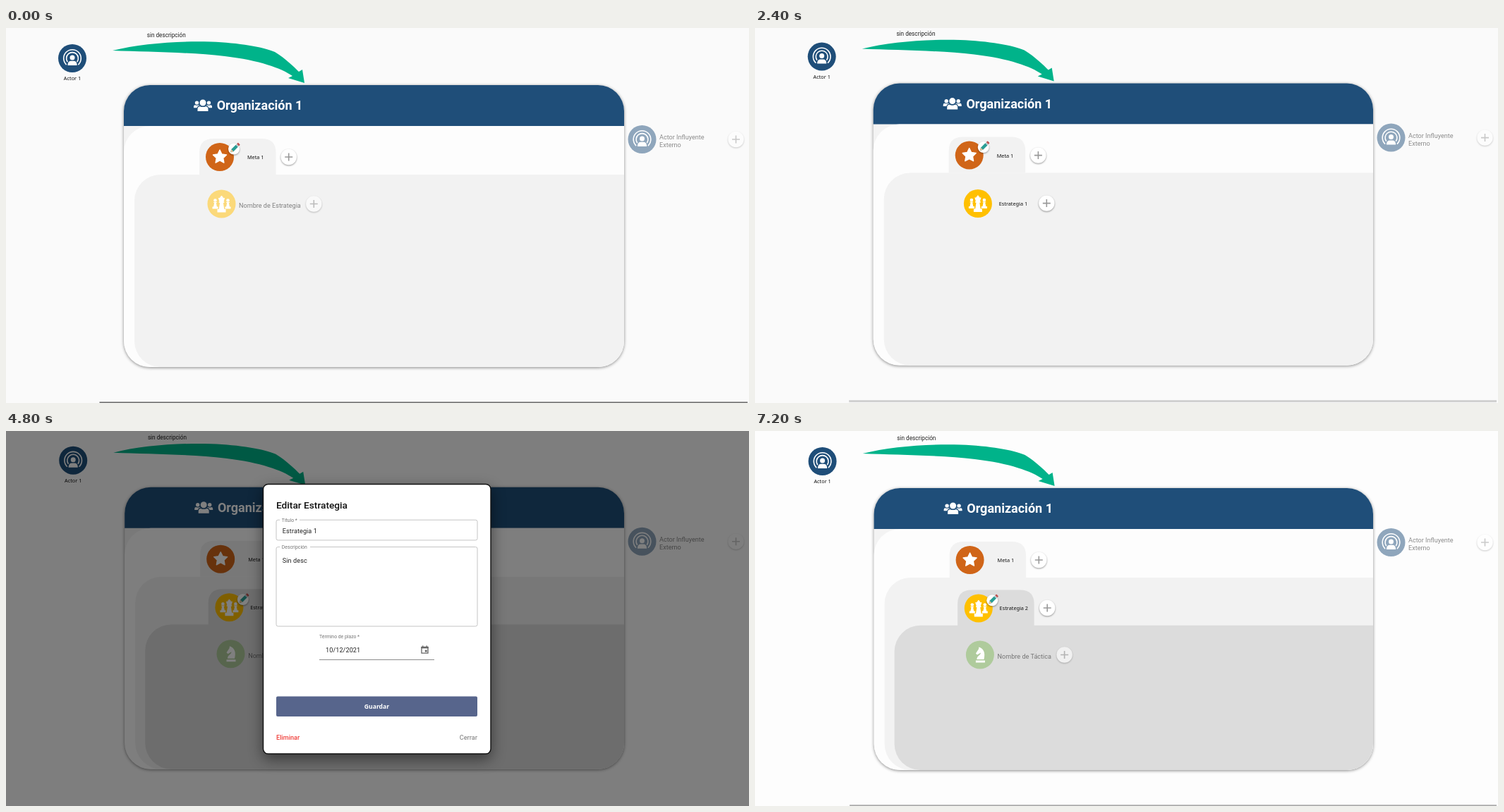
Write an HTML page that moves like this. It is 1053 by 532 pixels and loops after 8 s.

```html
<!DOCTYPE html>
<html lang="es">
<head>
<meta charset="utf-8">
<style>
html, body { margin: 0; width: 100%; height: 100%; overflow: hidden; background: #fafafa; }
svg { display: block; width: 1053px; height: 532px; }
text { font: 9.1px Roboto, sans-serif; white-space: pre; }
.name { font: 500 7.3px "Noto Sans", sans-serif; }
.head { font-weight: 700; font-size: 18px; }
.title { font-weight: 500; font-size: 13.7px; }
.label { font-size: 6.85px; }
.value { letter-spacing: .00938em; }
.action { font-weight: 500; }
.button { font: 700 8.6px "Noto Sans", sans-serif; }
.board { filter: drop-shadow(0 1px 2px #0007); }
.plus { filter: drop-shadow(0 1px 1.2px #0006); }
.dialog { filter: drop-shadow(0 7px 10px #0007); }
</style>
</head>
<body>
<svg id="stage" viewBox="0 0 1053 532"></svg>
<script>
const BLUE = '#1f4e79', RIGHT = 876, BOTTOM = 481, R = 37;
const HOLD = 1200, LOOP = 8000;

// One entry per hard cut: board offset, page colour, stage of the strategy, scrollbar colour, dialog
const scenes = [
  { dx: 0, dy: 0, page: '#fafafa', step: 0, bar: '#777' },
  { dx: 1.5, dy: -1.6, page: '#fafafa', step: 0, dialog: {
    x: 365, y: 72, h: 387, area: 98.5, button: 311, foot: 367, title: 'Nueva Estrategia', name: 'Estrategia 1',
    star: ' *', desc: 'Sin desc', wavy: true, submit: 'Agregar Estrategia' } },
  { dx: .7, dy: -2.4, page: '#fafafa', step: 1, bar: '#d0d0d0' },
  { dx: 1.2, dy: -2.2, page: '#fdfdfd', step: 2, bar: '#d0d0d0' },
  { dx: 1.2, dy: -1.3, page: '#fdfdfd', step: 2, dialog: {
    x: 364.5, y: 75, h: 382.5, area: 89.5, button: 301.5, foot: 362.5, title: 'Editar Estrategia', name: 'Estrategia 1',
    star: '', desc: 'Sin desc', submit: 'Guardar', remove: true } },
  { dx: .7, dy: -2.4, page: '#fdfdfd', step: 2, dialog: {
    x: 364, y: 65, h: 400, area: 89.3, button: 319.6, foot: 380.5, title: 'Editar Estrategia', name: 'Estrategia 2',
    star: '', desc: 'Sin desc 2', wavy: true, submit: 'Guardar', remove: true, error: true } },
  { dx: 1.6, dy: 0, page: '#fdfdfd', step: 2, bar: '#aaa', strategy: 'Estrategia 2' }
];

const text = (x, y, s, cls = '', fill = '#222', anchor = 'start') =>
  `<text x="${x}" y="${y}" class="${cls}" fill="${fill}" text-anchor="${anchor}">${s}</text>`;
const rect = (x, y, w, h, fill, extra = '') =>
  `<rect x="${x}" y="${y}" width="${w}" height="${h}" fill="${fill}" ${extra}/>`;
const path = (d, fill, extra = '') => `<path d="${d}" fill="${fill}" ${extra}/>`;
const circle = (x, y, r, fill) => `<circle cx="${x}" cy="${y}" r="${r}" fill="${fill}"/>`;
const at = (x, y, body, extra = '') => `<g transform="translate(${x} ${y})" ${extra}>${body}</g>`;
const badge = (x, y, fill, icon, extra) => at(x, y, circle(0, 0, 20, fill) + icon, extra);

// Arc around the origin, open at the bottom
const wave = (r, open) => {
  const x = r * Math.sin(open), y = r * Math.cos(open);
  return path(`M${-x} ${y}A${r} ${r} 0 1 1 ${x} ${y}`, 'none', 'stroke="#fff" stroke-width="1.6" stroke-linecap="round"');
};
const actorIcon = wave(12.3, .8) + wave(8.4, 1) + circle(0, -1, 3.5, '#fff') +
  path('M-6.5 10V8.5Q-6 4 -2 3.8H2Q6 4 6.5 8.5V10Z', '#fff');

const starIcon = path('M' + Array.from({ length: 10 }, (_, i) => {
  const r = i % 2 ? 5 : 10, a = i * Math.PI / 5;
  return `${r * Math.sin(a)} ${-r * Math.cos(a)}`;
}).join('L') + 'Z', '#fff', 'stroke="#fff" stroke-width="1.4" stroke-linejoin="round"');

const pawn = x => at(x, 0, circle(0, -5, 2.3, '#fff') +
  path('M-2.4 -2.6H2.4V-1.5H1.3L2.4 4H4V7H-4V4H-2.4L-1.3 -1.5H-2.4Z', '#fff'));
const chessIcon = pawn(-9) + pawn(9) +
  path('M-.9 -11.5H.9V-10H2.2V-8.5H4.6L3 -3H3.8V-1.4H2.4L3.8 7.5H6V12H-6V7.5H-3.8L-2.4 -1.4H-3.8V-3H-3L-4.6 -8.5H-2.2V-10H-.9Z', '#fff');
const knightIcon = path('M-6 11V8H7V11ZM-4.5 6.5C-4.5 1 1 1 1 -3L-4 0L-6 -2L-2 -8L-1.5 -11C5 -9 8 -3 5.5 6.5Z', '#fff');

const person = (x, y, s) => at(x, y, circle(0, -4, 4.5, '#fff') +
  path('M-7.5 8V5Q-7.5 1.2 -4 1.2Q0 3 4 1.2Q7.5 1.2 7.5 5V8Z', '#fff')).replace(')', `) scale(${s})`);
const peopleIcon = person(270.5, 108.5, .6) + person(287.5, 108.5, .6) +
  path('M270.5 119V114.5Q271 109.5 275 110H283Q287 109.5 287.5 114.5V119Z', BLUE) + person(279, 110, 1);

const plus = (x, y, opacity = 1) => at(x, y, `<g class="plus">${circle(0, 0, 11.2, '#fff')}</g>` +
  path('M-5.5 0H5.5M0 -5.5V5.5', 'none', 'stroke="#999" stroke-width="1.6"'), `opacity="${opacity}"`);

const pencil = (x, y) => at(x, y, `<g class="plus">${circle(0, 0, 8, '#fff')}</g>` +
  `<g transform="rotate(45)">` + path('M-2.2 -6V3L0 7L2.2 3V-6Z', '#2a9d94') +
  path('M-2.2 3L0 7L2.2 3Z', '#e8c39a') + rect(-2.2, -8, 4.4, 2, '#b8c4c8') +
  rect(-2.2, -10.5, 4.4, 2.6, '#c0504d', 'rx="1"') + `</g>`);

const tab = (x, y, fill) => path(`M${x} ${y + 51}v-31q0 -20 20 -20h68.5q20 0 20 20v31Z`, fill);

function panel(x, y, right, fill) {
  return path(`M${right} ${y}H${x + R}A${R} ${R} 0 0 0 ${x} ${y + R}V${BOTTOM - R}A${R} ${R} 0 0 0 ${x + R} ${BOTTOM}` +
    `H${right - R}A${R} ${R} 0 0 0 ${right} ${BOTTOM - R}Z`, fill);
}

function board({ dx, step, strategy = 'Estrategia 1' }) {
  const right = RIGHT - dx, w = right - 167;
  let s = badge(94, 43, BLUE, actorIcon) + text(94, 74.3, 'Actor 1', 'name', '#111', 'middle') +
    `<text x="199.7" y="13.3" style="font-size:8.2px" fill="#222">sin descripción</text>` +
    path('M151 32C190 22 245 18 290 19.5C330 21 365 27 381 34C397 44 408 55 415 62L420 59L423 78L400 71L406 68' +
      'C390 57 360 46 310 40C260 34 200 34 151 32Z', '#00b38a') +
    `<g class="board">${rect(167, 81, w, 400, '#f3f3f3', `rx="${R}"`)}</g>` +
    path(`M167 139V${81 + R}a${R} ${R} 0 0 1 ${R} ${-R}H${right - R}a${R} ${R} 0 0 1 ${R} ${R}V139Z`, BLUE) +
    peopleIcon + text(298.7, 116.3, 'Organización 1', 'head', '#fff') +
    panel(167, 139, right, '#fdfdfd') + tab(274, 157, '#f2f2f2') + panel(182, 208, right, '#f2f2f2') +
    badge(303, 183, '#d06518', starIcon) + text(342, 186, 'Meta 1', 'name', '#111') + plus(400.7, 183);
  if (step < 2) s += pencil(323, 171.5);
  if (step === 0) {
    return s + badge(305.5, 249.5, '#fbd97a', chessIcon) +
      text(330, 254.5, 'Nombre de Estrategia', '', '#808080') + plus(436.3, 249.5, .6);
  }
  if (step === 2) s += tab(285.5, 225.5, '#dcdcdc') + panel(196, 275.8, right, '#dcdcdc');
  s += badge(315.2, 251.5, '#ffc000', chessIcon) + text(345, 254.3, strategy, 'name', '#111') + plus(412.6, 251);
  if (step === 2) {
    s += pencil(334.6, 240.3) + badge(317.3, 317.5, '#afcb9c', knightIcon) +
      text(342, 323, 'Nombre de Táctica', '', '#757575') + plus(437, 317.5, .6);
  }
  return s;
}

function field(y, h, label, notch) {
  return rect(18.5, y, 285, h, 'none', 'rx="2.5" stroke="#c4c4c4"') +
    rect(23.5, y - 1, notch, 2, '#fff') + text(26.3, y + 2.8, label, 'label', '#757575');
}

function calendar(x, y) {
  return at(x, y, path('M-4.5 -3.6H4.5V5H-4.5Z', 'none', 'stroke="#666" stroke-width="1.3"') +
    rect(-5, -4.4, 10, 2.6, '#666') + rect(-3.4, -5.8, 1.3, 2, '#666') + rect(2.1, -5.8, 1.3, 2, '#666') +
    rect(.3, .5, 2.8, 2.8, '#666'));
}

function dialog(d) {
  const w = 687 - d.x, { area, button, foot } = d, red = '#f0403c';
  let s = `<g class="dialog">${rect(0, .5, w, d.h, '#fff', 'rx="7" stroke="#111" stroke-width="1.4"')}</g>` +
    text(18.5, 34.8, d.title, 'title', '#111') +
    field(51.2, 28.7, 'Título *', 28) + text(27.3, 69.8, d.name, 'value') +
    field(area, 112.5, 'Descripción' + d.star, d.star ? 48 : 43) + text(27.3, area + 22, d.desc, 'value') +
    text(79.5, area + 129, 'Término de plazo *', 'label', '#757575') +
    text(88.5, area + 149.7, '10/12/2021', 'value') + calendar(229, area + 145.7) +
    rect(79.5, area + 159.5, 163, 1, '#8c8c8c') +
    rect(18.5, button, 285, 28.5, '#57658c', 'rx="2"') +
    text(161, button + 17.4, d.submit, 'button', '#fff', 'middle') +
    text(303.5, foot, 'Cerrar', 'action', '#8e8e8e', 'end');
  if (d.wavy) s += path(`M42.8 ${area + 23.8}q.8 -1.6 1.6 0` + 't1.6 0'.repeat(11), 'none', 'stroke="#e33" stroke-width=".8"');
  if (d.remove) s += text(18.5, foot, 'Eliminar', 'action', red);
  if (d.error) s += text(18.5, 281.5, 'Todos los campos deben ser llenados*', 'action', red);
  return rect(0, 0, 1053, 532, '#000', 'opacity=".5"') + at(d.x, d.y, s);
}

function draw(scene) {
  const { dx, dy, page, bar } = scene;
  const outside = badge(901.5, 158, '#8fa6bc', actorIcon) + text(926, 158, 'Actor Influyente', '', '#8c8c8c') +
    text(926, 169, 'Externo', '', '#8c8c8c') + plus(1034.5, 158, .5);
  stage.innerHTML = rect(0, 0, 1053, 532, page) + at(dx, dy, board(scene)) + at(0, dy, outside) +
    (bar ? rect(132.5 + dx, 530.3 + dy, 918.5 - dx, 3, bar) : '') +
    (scene.dialog ? dialog(scene.dialog) : '');
}

const stage = document.getElementById('stage');
const start = performance.now();
let shown = -1;
function tick() {
  const i = Math.floor((performance.now() - start) % LOOP / HOLD);
  if (i !== shown) draw(scenes[shown = i]);
  requestAnimationFrame(tick);
}
tick();
</script>
</body>
</html>
```
